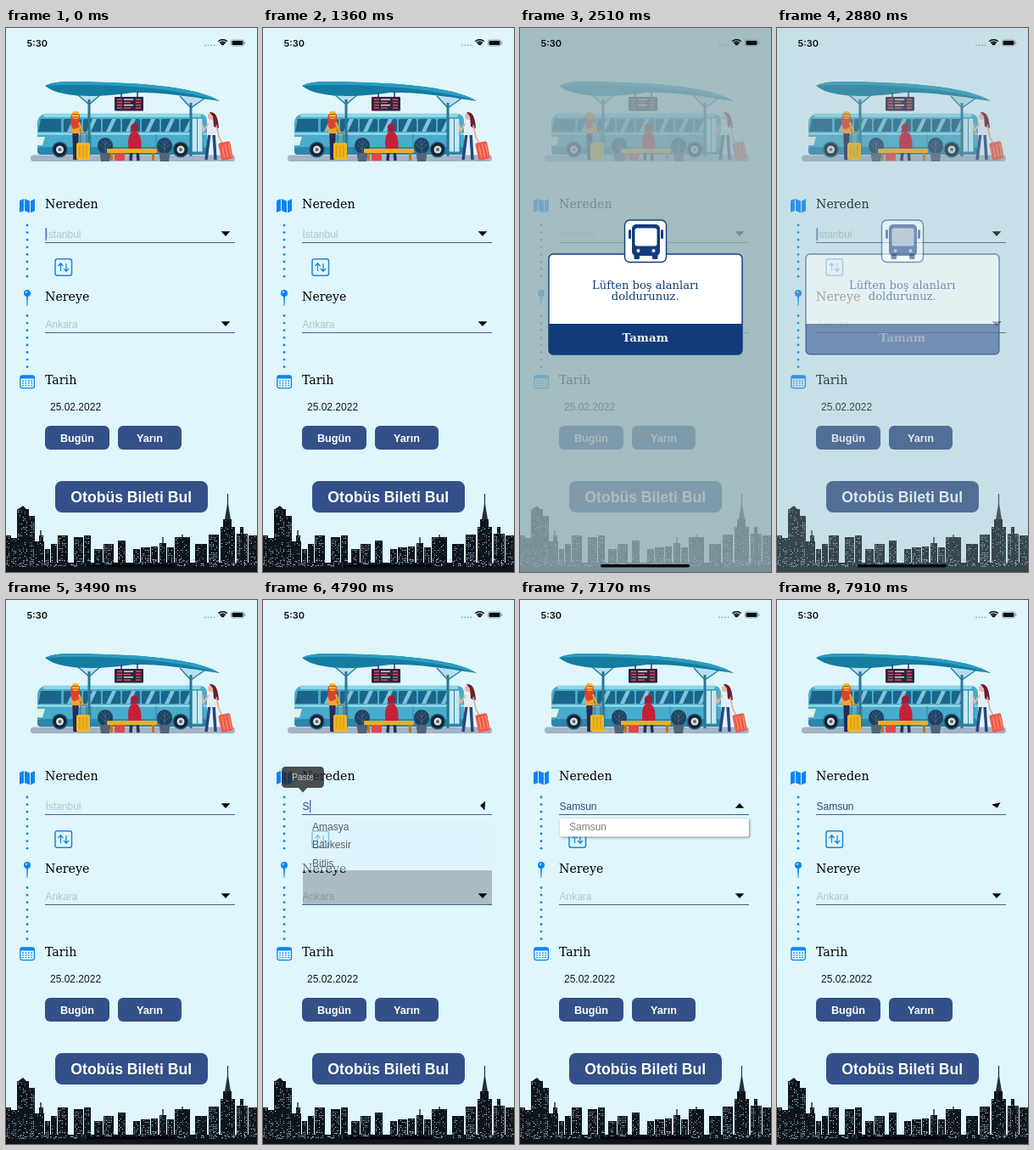
Write an HTML page with a canvas that moves like this. It is 296 px wide and 640 px high and loops after 8 s.

```html
<!DOCTYPE html>
<html lang="tr">
<head>
<meta charset="utf-8">
<title>Otobüs Bileti</title>
<style>
  html, body { margin: 0; width: 100%; height: 100%; overflow: hidden; background: #dff6fd; }
  canvas { display: block; width: 296px; height: 640px; }
</style>
</head>
<body>
<canvas id="stage" width="296" height="640"></canvas>
<script>
const W = 296, H = 640, LOOP = 8000;
const SANS = '"Liberation Sans", Arial, sans-serif';
const SLAB = '"DejaVu Serif", serif';
const BLUE = '#0b84f3', NAVY = '#123b7c', BUTTON = '#345088';
const screen = document.getElementById('stage').getContext('2d');
let c = screen;

const clamp = v => Math.max(0, Math.min(1, v));
const ramp = (t, from, to) => clamp((t - from) / (to - from));

function box(x, y, w, h, r, fill, stroke, lw = 1) {
  c.beginPath();
  c.roundRect(x, y, w, h, r);
  paint(fill, stroke, lw);
}
function paint(fill, stroke, lw) {
  if (fill) { c.fillStyle = fill; c.fill(); }
  if (stroke) { c.strokeStyle = stroke; c.lineWidth = lw; c.stroke(); }
}
function dot(x, y, r, fill) {
  c.beginPath();
  c.arc(x, y, r, 0, 7);
  paint(fill);
}
function path(d, fill, stroke, lw = 1) {
  const p = new Path2D(d);
  if (fill) { c.fillStyle = fill; c.fill(p); }
  if (stroke) { c.strokeStyle = stroke; c.lineWidth = lw; c.stroke(p); }
}
function text(s, x, y, font, fill, align = 'left') {
  c.font = font;
  c.fillStyle = fill;
  c.textAlign = align;
  c.fillText(s, x, y);
}

/* ---------- still parts ---------- */

function drawBus() {
  box(29, 149.5, 241, 7.5, 3.5, '#a5b3c6');
  box(37, 101, 200, 48, [10, 8, 4, 5], '#4aaccb');
  box(44, 100.5, 186, 4.5, 2, '#8ed7e6');
  box(37, 123.5, 200, 2, 0, '#a5e0ec');
  box(37, 140, 200, 9, 4, '#2c86a9');
  path('M41 107H65V122H38Z', '#1c6489');
  for (let i = 0; i < 7; i++) {
    const x = 68 + i * 23;
    box(x, 107, 21, 15, 1.5, '#1c6489');
    path(`M${x + 4} 122L${x + 11} 107H${x + 16}L${x + 9} 122Z`, '#7fc2d8');
  }
  box(219, 106, 13, 40, 1.5, '#c7e8f0', '#2c86a9');
  path('M225.5 106V146M100 125V146M177 125V146', null, '#2c86a9');
  path('M37 128H46L43 138H37Z', '#d8f2f7');
  dot(41, 134, 2, '#fff3c0');
  for (const x of [63.5, 206]) {
    dot(x, 143, 9.5, '#1d6a8a');
    dot(x, 143, 8, '#1a2130');
    dot(x, 143, 4.5, '#d3dee5');
    dot(x, 143, 2, '#56677a');
  }
}

function drawShelter() {
  path('M84 78L98 90L112 78M205 80L218 94L234 83', '#b9dfee', '#2681a5', 1.5);
  box(96.5, 84, 3, 67, 0, '#2b7797');
  box(216.5, 88, 3, 63, 0, '#2b7797');
  path('M46 68C58 61 85 63 120 64C180 66 230 72 252 86C225 82 185 75 150 76C115 81 65 84 46 68Z', '#147ca1');
  path('M46 68C58 61 85 63 120 64C180 66 230 72 252 86C200 70 110 64 46 68Z', '#2b9cc0');
  path('M136 76V82M155 75V82', null, '#343a55', 1.5);
  box(128, 81, 34, 16.5, 1, '#2d2740');
  for (let i = 0; i < 4; i++) {
    const y = 83.5 + i * 3.3;
    box(131, y, 6, 1.4, 0, '#e8525c');
    box(139, y, 11 - i % 2 * 3, 1.4, 0, i % 2 ? '#e8525c' : '#e6dfe8');
    box(153, y, 6, 1.4, 0, '#e8525c');
  }
}

function drawPeople() {
  for (const x of [117, 187]) {
    c.beginPath();
    c.ellipse(x, 138.5, 9, 9.5, 0, 0, 7);
    paint('#20415f');
    path(`M${x} 148V131M${x - 7} 136L${x} 143L${x + 7} 136M${x - 5} 132L${x} 138L${x + 5} 132`, null, '#42718f', .8);
    path(`M${x - 6.5} 147H${x + 6.5}L${x + 5} 157H${x - 5}Z`, '#53637a');
  }
  // seated traveller
  path('M148 144L147 156M155 144L156 156', null, '#2c2f52', 3.5);
  path('M145 144C142 130 146 122 151 121C158 122 161 132 159 144Z', '#c4203a');
  dot(151.5, 117, 4.6, '#a51d33');
  box(119, 142, 59, 5, 1, '#f0ae22');
  box(123, 147, 3, 9, 0, '#b97b1b');
  box(172, 147, 3, 9, 0, '#b97b1b');
  box(128, 147, 12, 9, 1.5, '#e0474c');
  // left traveller
  path('M80 121L81 155M84 121L83 155', null, '#252b55', 3.5);
  path('M77 108L85 106L88 124H77Z', '#f2a12b');
  path('M77 102C75 112 77 119 81 119L87 116V102Z', '#d9442e');
  box(78, 98, 8, 9, 3, '#f3b71f');
  path('M78 101.5H86M78 105H86', null, '#d9442e', 1.2);
  path('M86 111L91 124', null, '#f2a12b', 2.5);
  path('M88 136V124H95V136', null, '#6a5b4a');
  box(83, 135, 16, 20, 2, '#f2b51d');
  path('M87 138V152M91 138V152M95 138V152', null, '#cf8d13');
  // right traveller
  path('M240 124L236 155M245 124L247 155', null, '#2b447f', 3.5);
  path('M238 110H247L248 126H238Z', '#e4edf6');
  path('M239 112L233 121L231 112', null, '#f0b79c', 2);
  dot(242, 104, 4, '#f0b79c');
  path('M240 99C247 98 250 104 251 118L245 116L244 104Z', '#6b1f33');
  path('M248 114L251 128L255 136', null, '#e0a48c', 1.5);
  c.save();
  c.translate(259, 144);
  c.rotate(-.2);
  box(-7, -10, 14, 21, 2, '#ef5a50');
  path('M-3 -7V8M1 -7V8M5 -7V8', null, '#ffa06c');
  c.restore();
}

function drawSkyline() {
  let seed = 7;
  const rnd = () => (seed = seed * 16807 % 2147483647) / 2147483647;
  const towers = [
    [0, 6, 597], [6, 7, 600], [13, 14, 566], [27, 7, 574], [34, 11, 604], [39, 5, 597],
    [46, 6, 613], [53, 7, 607], [61, 12, 597], [80, 11, 599], [92, 8, 597], [104, 10, 613],
    [115, 12, 607], [132, 9, 603], [150, 8, 613], [159, 11, 611], [171, 8, 610], [181, 8, 606],
    [190, 8, 611], [199, 18, 599], [223, 14, 607], [239, 12, 596], [253, 17, 587], [256, 10, 578],
    [272, 13, 595], [276, 4, 587], [286, 10, 597]
  ];
  box(0, 629, W, 11, 0, '#0d141c');
  path('M13 567L20 562L27 569Z', '#10171f');
  path('M41 597V591M185 606V599M208 599V596', null, '#273340', 1.5);
  path('M261.5 578V548', null, '#253140', 1.2);
  path('M258 578L261 560H262L265 578Z', '#253140');
  towers.forEach(([x, w, top], i) => {
    box(x, top, w, H - top, 0, '#0d141c');
    const lit = i % 3 ? .35 : .6;
    for (let y = top + 1; y < 634; y += 2)
      for (let wx = x + 1; wx < x + w - 1; wx += 2)
        if (rnd() < lit) box(wx, y, 1, 1, 0, rnd() < .5 ? '#cfdfe7' : '#71838f');
  });
  for (let x = 0; x < W; x += 2) if (rnd() < .5) box(x, 625 + rnd() * 8, 2, 1, 0, '#a3b5bf');
}

function drawForm() {
  const label = `14.2px ${SLAB}`;
  text('Nereden', 46, 212, label, '#000');
  text('Nereye', 46, 320.5, label, '#000');
  text('Tarih', 46, 419, label, '#000');

  path('M16 203L21 201V215L16 217ZM22 201L28 203.5V217.5L22 215ZM29 203.5L34 201V215L29 217.5Z', BLUE);
  for (let i = 0; i < 8; i++) {
    dot(25, 232 + i * 8.6, 1.4, BLUE);
    dot(25, 338.5 + i * 8.6, 1.4, BLUE);
  }
  dot(25, 312, 4, BLUE);
  dot(24, 310.8, 1.1, '#bfe4ff');
  path('M24 315H26L25.4 327H24.6Z', BLUE);
  box(16.8, 409, 16.6, 14.6, 2.5, null, BLUE, 1.3);
  box(17, 409, 16, 3.5, 1, BLUE);
  for (let i = 0; i < 12; i++) box(19.2 + i % 4 * 3.4, 414.5 + (i >> 2) * 2.7, 1.6, 1.4, 0, BLUE);

  box(58, 271.8, 19.5, 19.5, 2.5, null, '#1d86d4', 1.5);
  path('M64.5 286V277M61.5 280L64.5 276.7L67.5 280M71 277V286.3M68 283L71 286.3L74 283', null, '#1d86d4', 1.3);

  box(46, 252, 224, 1, 0, '#45608f');
  box(46, 358, 224, 1, 0, '#45608f');
  text('Ankara', 46.5, 352.5, `12px ${SANS}`, '#b4c3c9');
  text('25.02.2022', 52, 449.5, `12px ${SANS}`, '#14181b');

  box(46, 468, 76, 28, 6, BUTTON);
  box(132, 468, 75, 28, 6, BUTTON);
  box(58, 533, 180, 37, 8, BUTTON);
  const bold = size => `bold ${size}px ${SANS}`;
  text('Bugün', 84, 486.5, bold(12.7), '#fff', 'center');
  text('Yarın', 169.5, 486.5, bold(12.7), '#fff', 'center');
  text('Otobüs Bileti Bul', 147.7, 557.5, bold(17.6), '#fff', 'center');
}

function drawSystemBar() {
  text('5:30', 24.5, 21.5, '600 11px Inter, sans-serif', '#0a0c0d');
  for (let i = 0; i < 4; i++) dot(235 + i * 3.5, 20.3, .9, '#8fa0a6');
  for (const r of [2.5, 5, 7.6]) {
    c.beginPath();
    c.arc(255.5, 21.3, r, -2.32, -.82);
    paint(null, '#0a0c0d', r < 3 ? 2.6 : 1.6);
  }
  box(265.5, 14, 15, 7, 2, null, '#7c898d', .8);
  box(266.6, 15, 12.8, 5, 1.2, '#0a0c0d');
  box(281.3, 16.3, 1, 2.4, .5, '#7c898d');
  box(95, 631, 105, 3.4, 1.7, '#050607');
}

const still = document.createElement('canvas');
still.width = W;
still.height = H;
c = still.getContext('2d');
box(0, 0, W, H, 0, '#dff6fd');
drawBus();
drawShelter();
drawPeople();
drawSkyline();
drawForm();
c = screen;

/* ---------- moving parts ---------- */

const OPEN = 4725, SELECT = 6960, CLOSE = 7360, ROW = 21.4;
const typing = [[4680, 'S'], [5100, 'Sa'], [5330, 'Sam'], [5550, 'Sams'], [5670, 'Samsu'], [5950, 'Samsun']];
const matches = [
  [OPEN, ['Amasya', 'Balıkesir', 'Bitlis', 'Bursa', 'Eskişehir', 'Giresun', 'Gümüşhane']],
  [5100, ['Bursa', 'Manisa', 'Sakarya', 'Samsun']],
  [5330, ['Samsun']]
];
const blinks = [120, 460, 1120, 2780, 3380, 3700, 4320, 4640, 6070, 6270, 6960];

const latest = (steps, t) => steps.filter(s => s[0] <= t).pop();

function caretAlpha(t) {
  const n = blinks.filter(b => b <= t).length;
  const k = n ? ramp(t, blinks[n - 1], blinks[n - 1] + 100) : 1;
  return n % 2 ? 1 - k : k;
}

// underdamped spring for opening, critically damped for closing
function openAmount(t) {
  if (t < OPEN) return 0;
  const s = (t - OPEN) / 1000;
  return 1 - Math.exp(-7.7 * s) * (Math.cos(17.6 * s) + .44 * Math.sin(17.6 * s));
}
function closeAmount(t) {
  const x = Math.max(0, t - CLOSE) / 1000 * 7.8;
  return 1 - Math.exp(-x) * (1 + x);
}

function triangle(x, y, angle) {
  c.save();
  c.translate(x, y);
  c.rotate(angle);
  path('M-5.3 -2.7H5.3L0 2.9Z', '#000');
  c.restore();
}

function drawField(t) {
  const typed = latest(typing, t);
  c.font = `12px ${SANS}`;
  const caretX = typed ? 47 + c.measureText(typed[1]).width : 46.5;
  if (typed) text(typed[1], 46.5, 246.5, `12px ${SANS}`, '#2e4778');
  else text('İstanbul', 46.5, 246.5, `12px ${SANS}`, '#b4c3c9');
  c.globalAlpha = caretAlpha(t);
  box(caretX, 235, 1.3, 15, 0, '#3767c8');
  c.globalAlpha = 1;
  triangle(259, 242, Math.PI * (openAmount(t) + closeAmount(t)));
  triangle(259, 348, 0);
}

function drawList(t) {
  if (t < OPEN) return;
  const p = openAmount(t), shut = closeAmount(t);
  const [since, names] = latest(matches, t);
  const full = n => Math.min(n, 5.5) * ROW;
  let h = full(names.length);
  if (since === OPEN) h *= p;
  else {
    const before = latest(matches, since - 1)[1];
    h += (full(before.length) - h) * (1 - ramp(t, since, since + 200)) ** 2;
  }
  h *= 1 - 1.12 * shut;
  if (h < 1) return;

  const early = t < OPEN + 110;
  if (early) box(47, 257 + h, 223, Math.max(0, 101 - h), 0, 'rgba(0,0,0,.24)');
  c.save();
  c.globalAlpha = early ? .65 : 1 - shut * .6;
  if (!early) {
    c.shadowColor = 'rgba(0,0,0,.45)';
    c.shadowBlur = 3;
    c.shadowOffsetX = c.shadowOffsetY = 1;
  }
  box(47, 257, 223, h, 2.5, early ? 'rgba(223,246,253,.8)' : '#fff');
  c.shadowColor = 'transparent';
  c.clip();
  c.globalAlpha *= t < SELECT ? 1 : .2 + .8 * ramp(t, SELECT, SELECT + 500);
  names.forEach((name, i) => text(name, 58, 271 + i * ROW, `12px ${SANS}`, '#111'));
  c.restore();
}

function drawPaste(t) {
  c.globalAlpha = ramp(t, 4000, 4140) * (1 - ramp(t, 4760, 4920));
  path('M27 196H67Q72 196 72 201V216Q72 221 67 221H52L47 226.5L42 221H27Q22 221 22 216V201Q22 196 27 196Z', '#26282b');
  text('Paste', 47, 212, `10px ${SANS}`, '#e6e8ea', 'center');
  c.globalAlpha = 1;
}

function drawAlert(t) {
  const rise = 1 - (1 - ramp(t, 1365, 1760)) ** 4;
  const left = 1 - ramp(t, 2750, 3240);
  const p = rise * left ** 2;
  if (!p) return;
  c.globalAlpha = .8 * rise * left ** 3;
  box(0, 0, W, H, 0, '#94aeb5');
  c.globalAlpha = p;
  box(34, 266, 228, 118, 5, '#fff', NAVY, 1.4);
  box(34, 348, 228, 36, [0, 0, 5, 5], NAVY);
  box(123.5, 226, 49, 49.5, 6, '#fff', NAVY, 1.4);
  box(132, 231, 33, 37, 5, NAVY);
  box(135.5, 235.5, 26, 21, 2.5, '#fff');
  box(128, 237, 3, 11, 1.5, NAVY);
  box(166, 237, 3, 11, 1.5, NAVY);
  box(134.5, 266, 6.5, 6, 1.5, NAVY);
  box(156, 266, 6.5, 6, 1.5, NAVY);
  dot(139.5, 262, 2, '#fff');
  dot(157.5, 262, 2, '#fff');
  text('Lüften boş alanları', 147.7, 307, `13.1px ${SLAB}`, NAVY, 'center');
  text('doldurunuz.', 147.7, 320, `13.1px ${SLAB}`, NAVY, 'center');
  c.globalAlpha = p * (1 - .4 * ramp(t, 2480, 2640));
  text('Tamam', 147.7, 369, `bold 13.4px ${SLAB}`, '#fff', 'center');
  c.globalAlpha = 1;
}

function frame() {
  const t = performance.now() % LOOP;
  c.drawImage(still, 0, 0);
  drawField(t);
  drawList(t);
  drawPaste(t);
  drawAlert(t);
  drawSystemBar();
  requestAnimationFrame(frame);
}
frame();
</script>
</body>
</html>
```
